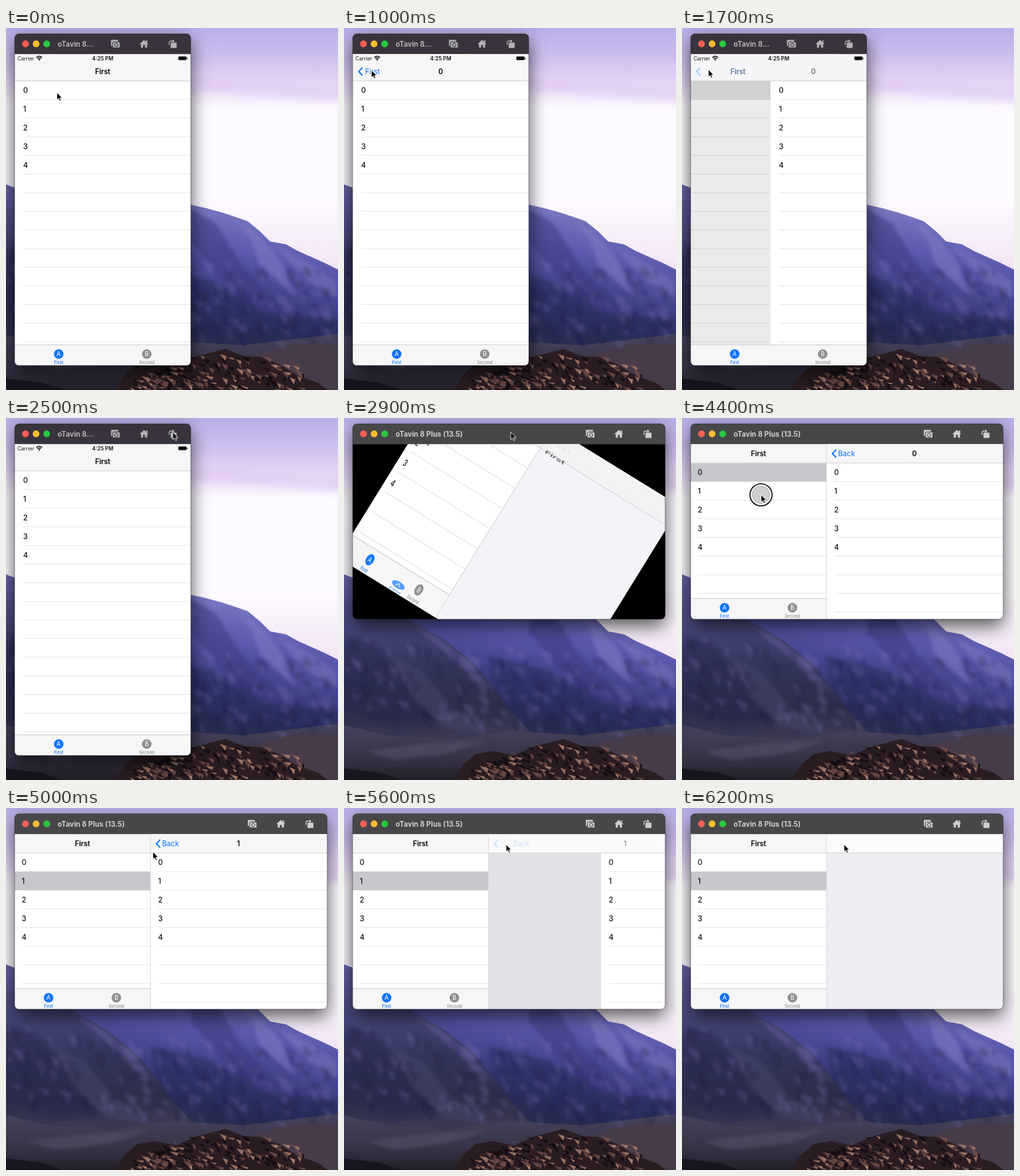
An HTML page for the animation above (6300 ms loop, 460 by 502 pixels).

```html
<!DOCTYPE html>
<html lang="en">
<head>
<meta charset="utf-8">
<title>Tab navigation demo</title>
<style>
  html, body { margin: 0; width: 100%; height: 100%; overflow: hidden; background: #fff; }
  svg { display: block; }
  text { font-family: Inter, Roboto, sans-serif; }
</style>
</head>
<body>
<svg id="stage" width="460" height="502" viewBox="0 0 460 502">
  <defs>
    <linearGradient id="sky" x2="0" y2="1">
      <stop offset="0" stop-color="#b9aee8"/>
      <stop offset=".12" stop-color="#cfbfef"/>
      <stop offset=".22" stop-color="#e6d6f5"/>
      <stop offset=".32" stop-color="#fcf9ff"/>
      <stop offset=".7" stop-color="#fdfaff"/>
      <stop offset="1" stop-color="#f1e2f3"/>
    </linearGradient>
    <linearGradient id="far" gradientUnits="userSpaceOnUse" x1="310" y1="250" x2="275" y2="446">
      <stop offset="0" stop-color="#7a79c2"/>
      <stop offset=".3" stop-color="#5958ac"/>
      <stop offset=".58" stop-color="#3f4187"/>
      <stop offset=".82" stop-color="#2b2d58"/>
      <stop offset="1" stop-color="#343249"/>
    </linearGradient>
    <linearGradient id="near" gradientUnits="userSpaceOnUse" x1="60" y1="215" x2="80" y2="460">
      <stop offset="0" stop-color="#6763a8"/>
      <stop offset=".3" stop-color="#46477a"/>
      <stop offset=".55" stop-color="#32345a"/>
      <stop offset=".78" stop-color="#2d2e4c"/>
      <stop offset="1" stop-color="#3f3b55"/>
    </linearGradient>
    <linearGradient id="valley" x2="0" y2="1">
      <stop offset="0" stop-color="#45425c"/>
      <stop offset=".6" stop-color="#383446"/>
      <stop offset="1" stop-color="#211e28"/>
    </linearGradient>
    <filter id="soft" x="-20%" y="-50%" width="140%" height="200%"><feGaussianBlur stdDeviation="6"/></filter>
    <filter id="hazy" x="-20%" y="-20%" width="140%" height="140%"><feGaussianBlur stdDeviation="2.5"/></filter>
    <filter id="shade" x="-30%" y="-30%" width="160%" height="160%"><feGaussianBlur stdDeviation="13"/></filter>
  </defs>
  <g id="scenery">
    <rect width="460" height="345" fill="url(#sky)"/>
    <path d="M230 68L470 82V102L230 84Z" fill="#dcc6ef" opacity=".6" filter="url(#soft)"/>
    <path d="M0 217L14 222L120 236L256 245L278 250L300 256L318 262L335 268L352 282L366 296L388 300L404 309L424 318L442 326L460 335V502H0Z" fill="url(#far)"/>
    <g filter="url(#hazy)">
      <path d="M256 252L290 270L326 328L386 388L350 392L300 350L256 296Z" fill="#36387c" opacity=".5"/>
      <path d="M318 266L340 292L352 330L398 370L384 328L356 292Z" fill="#8884cb" opacity=".45"/>
      <path d="M376 304L400 332L432 360L458 374V352L424 328Z" fill="#8882c6" opacity=".4"/>
      <path d="M200 330L290 352L360 396L460 404V446H220Z" fill="#262a57" opacity=".5"/>
    </g>
    <path d="M0 217L14 224L60 254L98 284L140 308L180 340L206 372L232 408L262 440L250 470H0Z" fill="url(#near)"/>
    <g filter="url(#hazy)">
      <path d="M92 284L130 304L180 343L208 380L180 362L146 330Z" fill="#6a66a4" opacity=".45"/>
      <path d="M0 300L40 310L82 360L130 420L70 432L0 400Z" fill="#25274a" opacity=".45"/>
      <path d="M66 330L110 352L150 402L200 438L140 430L96 388Z" fill="#4d4b72" opacity=".4"/>
    </g>
    <path d="M0 426L60 440L150 446L230 434L330 440L460 424V502H0Z" fill="url(#valley)"/>
    <path d="M30 462L110 452L200 446L150 464L70 474Z" fill="#5a556c" opacity=".5" filter="url(#hazy)"/>
    <path d="M340 455L385 441L424 437L460 440V502H340Z" fill="#463b48"/>
    <path d="M0 486L50 492L80 502H0Z" fill="#17151d"/>
    <path d="M150 502L166 480L182 466L206 462L236 468L262 456L285 450L304 445L330 455L352 456L378 466L404 482L432 492L446 502Z" fill="#2a1d22"/>
  </g>
  <g id="app"></g>
</svg>
<script>
const LOOP = 6300, STEP = 100;
const BLUE = '#0b72ff', ROW = 25.85;

const clamp = v => Math.max(0, Math.min(1, v));
const ease = (t, a, b) => { const u = clamp((t - a) / (b - a)); return u * u * (3 - 2 * u); };
const slide = (t, start) => 1 - (1 - clamp((t - start) / 500)) ** 4;
const within = (t, a, b) => t >= a && t < b;

const rect = (x, y, w, h, fill, more = '') =>
  `<rect x="${x}" y="${y}" width="${w}" height="${h}" fill="${fill}" ${more}/>`;
const text = (x, y, str, size, fill, more = '') =>
  `<text x="${x}" y="${y}" font-size="${size}" fill="${fill}" ${more}>${str}</text>`;
const group = (transform, body, opacity = 1) =>
  `<g transform="${transform}" opacity="${opacity}">${body}</g>`;
const frame = (x, y, w, h, body) =>
  `<svg x="${x}" y="${y}" width="${w}" height="${h}">${body}</svg>`;
const MID = 'text-anchor="middle"', BOLD = MID + ' font-weight="600"';

// Facets on the slopes and rocks
function addTexture() {
  let seed = 11;
  const rnd = () => (seed = seed * 16807 % 2147483647) / 2147483647;
  const facets = (n, color, opacity, make) => {
    let d = '';
    for (let i = 0; i < n; i++) {
      const [x, y, w, h] = make();
      d += `M${x.toFixed(1)} ${y.toFixed(1)}l${w.toFixed(1)} ${(h * .5).toFixed(1)}l${(-w * .2).toFixed(1)} ${h.toFixed(1)}z`;
    }
    return `<path d="${d}" fill="${color}" opacity="${opacity}"/>`;
  };
  const rock = () => {
    const x = 172 + rnd() * 235, top = 450 + ((x - 305) / 130) ** 2 * 34;
    return [x, top + rnd() * (502 - top), 4 + rnd() * 9, 2 + rnd() * 5];
  };
  const slope = () => {
    const x = rnd() * 440;
    return [x, 296 + x * .08 + rnd() * 110, 4 + rnd() * 14, 5 + rnd() * 12];
  };
  document.getElementById('scenery').insertAdjacentHTML('beforeend',
    '<g filter="url(#hazy)">' + facets(90, '#7e79bc', .3, slope) +
    facets(90, '#191b3c', .35, slope) + '</g>' +
    facets(90, '#120c11', .9, rock) + facets(70, '#7a564d', .75, rock) +
    facets(40, '#bd8f7a', .75, rock));
}

function list(w, h, top, inset, selected = -1, strength = 1, selColor = '#d1d1d6') {
  let out = rect(0, 0, w, h, '#fff');
  for (let y = top + ROW; y < h; y += ROW)
    out += rect(inset, y - .5, w - inset, 1, '#e8e8ea');
  if (selected >= 0)
    out += rect(0, top + selected * ROW, w, ROW, selColor, `opacity="${strength}"`);
  for (let i = 0; i < 5; i++)
    out += text(inset - .3, top + i * ROW + 16.9, i, 10.2, '#111', 'font-weight="500"');
  return out;
}

const tab = (x, y, letter, label, color) =>
  `<circle cx="${x}" cy="${y}" r="6.6" fill="${color}"/>` +
  text(x, y + 3, letter, 8.4, '#fff', MID) +
  text(x, y + 14.2, label, 5.9, color, MID + ' font-weight="500"');

const tabBar = (w, y) =>
  rect(0, y, w, 30, '#f6f6f7') + rect(0, y - .5, w, 1, '#d2d2d4') +
  tab(w / 4, y + 12.8, 'A', 'First', BLUE) + tab(w * .75, y + 12.8, 'B', 'Second', '#8e8e92');

// Navigation stack: q runs from 0 (root) to 1 (page pushed)
function stack(o, q) {
  const { w, h, nav } = o, p = 1 - q, base = nav - 9.3;
  let out = group(`translate(${-.3 * w * q})`, o.root);
  if (q > 0) {
    out += rect(0, 0, w, h, '#000', `opacity="${.14 * q}"`);
    out += group(`translate(${w * p})`, list(w, h, nav, o.inset));
  }
  out += rect(0, 0, w, nav, o.bar) + rect(0, 0, w, nav, '#f6f6f7', `opacity="${q}"`);
  out += rect(0, nav - .5, w, 1, '#d4d4d7');
  const x = o.backX + (o.backTo - o.backX) * p ** 1.15, dim = q ** 1.7, cy = base - 3.6;
  if (o.title) out += text(x, base, o.title, 9.8, '#000', `${BOLD} opacity="${p}"`);
  if (q > 0) {
    out += text(x, base, o.back, 10, BLUE, `${MID} opacity="${dim}"`);
    out += `<path d="M13.6 ${cy - 5.5}L8.4 ${cy}L13.6 ${cy + 5.5}" fill="none" stroke="${BLUE}" stroke-width="1.7" opacity="${dim}"/>`;
    out += text(122 + 106 * p, base, o.page, 9.8, '#000', `${BOLD} opacity="${q}"`);
  }
  return out;
}

const statusBar = () =>
  text(4, 8.4, 'Carrier', 7, '#111') +
  '<g fill="none" stroke="#000" stroke-width="1.3"><path d="M30 4.6q4-3.4 8 0M31.6 6.4q2.4-2 4.8 0"/></g>' +
  '<circle cx="34" cy="8" r="1" fill="#000"/>' +
  text(122, 8.4, '4:25 PM', 7.3, '#111', BOLD) +
  rect(226.8, 3.2, 11.4, 5, '#000', 'rx="1.3"') + rect(238.6, 4.8, .9, 1.9, '#000');

function portrait(q, selected, strength) {
  return frame(0, 0, 244, 432, stack({
    w: 244, h: 432, nav: 37, inset: 12, bar: '#f6f6f7',
    title: 'First', back: 'First', page: '0', backX: 27.5, backTo: 122,
    root: list(244, 432, 37, 12, selected, strength)
  }, q) + statusBar() + tabBar(244, 403));
}

function landscape(q, page, selected, bar = '#f3f3f5') {
  const side = list(188, 243, 26, 10, selected, 1, '#c8c7cb') +
    rect(0, 0, 188, 26, '#f6f6f7') + rect(0, 25.5, 188, 1, '#d4d4d7') +
    text(94, 16.4, 'First', 9.8, '#000', BOLD) + tabBar(188, 214);
  const detail = stack({
    w: 245, h: 243, nav: 26, inset: 11, bar,
    title: '', back: 'Back', page, backX: 28, backTo: 58,
    root: rect(0, 0, 330, 243, '#eeedf3')
  }, q);
  return frame(0, 0, 188, 243, side) + frame(188, 0, 245, 243, detail) +
    rect(187.8, 0, .8, 243, '#d6d6d9');
}

// Portrait layout turning into the landscape one
function turning(p) {
  const w = 244 + 189 * p, h = 432 - 189 * p, fade = 1 - p;
  const ghost = text(122, 28 + 34 * p, 'First', 9.8, '#222', BOLD) +
    text(12, 157, '4', 10.2, '#222') + tab(61, 415.8, 'A', 'First', BLUE);
  const place = `translate(216.5 121.5) rotate(${90 * fade}) translate(${-w / 2} ${-h / 2})`;
  const old = `scale(${w / 244} ${h / 432})`;
  const fresh = landscape(0, '0', -1) + rect(187, 26, 246, 217, '#fff', `opacity="${fade}"`);
  return frame(0, 0, 433, 243, rect(0, 0, 433, 243, '#000') + group(place,
    group(`scale(${w / 433} ${h / 243})`, fresh) +
    group(old, portrait(0, -1), fade ** 3) +
    group(old, ghost, Math.min(1, 1.9 * fade))));
}

function content(t) {
  if (t < 2600) {
    const q = t < 1400 ? slide(t, 330) : 1 - slide(t, 1630);
    const selected = within(t, 300, 2200) ? 0 : -1;
    return portrait(q, selected, t < 1400 ? 1 : Math.min(1, q * 1.15));
  }
  if (t < 3100) return turning(ease(t, 2660, 3060));
  const q = t < 5000 ? slide(t, 3730) : 1 - slide(t, 5488);
  const selected = t < 3700 ? -1 : t < 4500 ? 0 : 1;
  return t < 4500 ? landscape(q, '0', selected) : landscape(q, '1', selected, '#fbfbfc');
}

function toolbar(wide, bg) {
  const ink = wide ? '#cfced0' : '#b4b1b7';
  const lights = ['#ff5f57', '#febc2e', '#28c840'].map((c, i) =>
    `<circle cx="${27 + i * 14.7}" cy="22" r="4.7" fill="${c}"/>`).join('');
  const icons = [
    rect(-6, -5.6, 10, 8.6, ink, 'rx="1"') +
      rect(-3.8, -2.6, 10.4, 8.2, ink, `rx="1.4" stroke="${bg}"`) +
      `<circle cx="1.4" cy="1.6" r="2.3" fill="none" stroke="${bg}"/>`,
    `<path d="M-6.2 .3L0 -5.5L6.2 .3H4.3V5.2H1.3V1.6H-1.3V5.2H-4.3V.3ZM3-5H4.6V-1.5L3-3Z" fill="${ink}"/>`,
    rect(-3, -1.8, 8.4, 7.6, ink, 'rx="1.2"') +
      `<path d="M-5 1.5V-1.4Q-5-3.8-2.6-3.8H0" fill="none" stroke="${ink}" stroke-width="1.2"/>` +
      `<path d="M-.4-6.2L2.6-3.8L-.4-1.4Z" fill="${ink}"/>`
  ];
  const x0 = wide ? 341 : 151.5;
  return lights +
    text(71.5, 25.5, wide ? 'oTavin 8 Plus (13.5)' : 'oTavin 8...', 9.9, ink, 'font-weight="700"') +
    icons.map((icon, i) => group(`translate(${x0 + i * 39.8} 22)`, icon)).join('');
}

function deviceWindow(t) {
  const wide = t >= 2600, w = wide ? 433 : 244, h = wide ? 271 : 460;
  const bg = wide ? '#474648' : '#38333c';
  return rect(12, 17, w, h, '#000', 'rx="6" opacity=".68" filter="url(#shade)"') +
    `<clipPath id="edge">${rect(12, 8, w, h, '#000', 'rx="6"')}</clipPath>` +
    `<g clip-path="url(#edge)">${rect(12, 8, w, 28.5, bg)}${toolbar(wide, bg)}` +
    `${group('translate(12 36.3)', content(t))}</g>` +
    rect(12, 8, w, h, 'none', 'rx="6" stroke="#2b282e" stroke-opacity=".55" stroke-width=".8"');
}

// Pointer stops: time, x, y
const PATH = [
  [0, 70.5, 89.5], [450, 70.5, 89.5], [950, 38, 58.5], [1500, 36.5, 57.5], [1900, 36.5, 57.5],
  [2400, 231, 19.5], [3000, 231, 19.5], [3500, 106, 77], [3950, 106, 77],
  [4250, 109.5, 106.5], [4600, 109.5, 106.5], [5150, 224.5, 50.5], [LOOP, 224.5, 50.5]
];
const PRESSES = [[200, 300], [1500, 1600], [2400, 2500], [3600, 3700], [4300, 4500], [5300, 5400]];

function pointer(t) {
  const i = PATH.findIndex((s, k) => k && t < s[0]);
  const [t0, x0, y0] = PATH[i - 1], [t1, x1, y1] = PATH[i];
  const u = ease(t, t0, t1), x = x0 + (x1 - x0) * u, y = y0 + (y1 - y0) * u;
  const ring = PRESSES.some(([a, b]) => within(t, a, b))
    ? '<circle r="15.3" fill="none" stroke="#111" stroke-width="1.6"/>' +
      '<circle r="12" fill="#c4c4c6" fill-opacity=".8" stroke="#9b9b9d" stroke-width=".8"/>' : '';
  return group(`translate(${x} ${y})`, ring +
    '<path d="M0 0V10.3L2.4 8.2L4 11.8L5.8 11L4.2 7.5H7.4Z" fill="#000" stroke="#fff" stroke-width=".8"/>');
}

const app = document.getElementById('app');
let shown = -1;
function tick() {
  const t = Math.floor(performance.now() % LOOP / STEP) * STEP;
  if (t !== shown) {
    shown = t;
    app.innerHTML = deviceWindow(t) + pointer(t);
  }
  requestAnimationFrame(tick);
}
addTexture();
tick();
</script>
</body>
</html>
```
